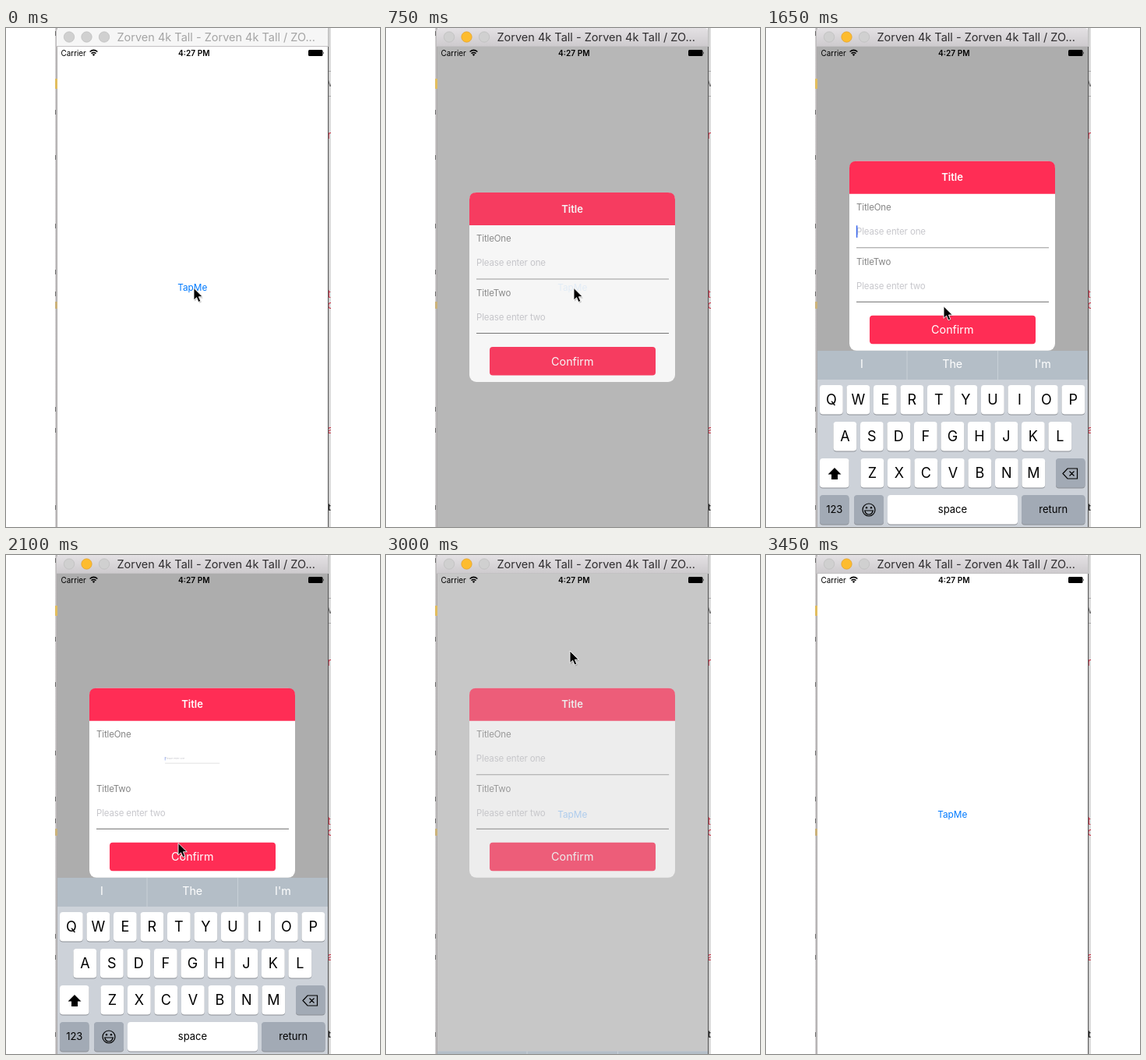
Write an HTML page that moves like this. It is 480x640 px and loops after 3.6 s.

```html
<!DOCTYPE html>
<html lang="en">
<head>
<meta charset="utf-8">
<style>
  html, body { margin: 0; width: 100%; height: 100%; overflow: hidden; background: #fff; }
  svg { display: block; width: 480px; height: 640px; font-family: Inter, Roboto, sans-serif; }
  .mid { text-anchor: middle; }
  .label { font-size: 11.5px; letter-spacing: -.15px; fill: #858585; }
  .hint { font-size: 11.5px; letter-spacing: -.15px; fill: #c7c7cc; }
  .side { font-size: 13px; fill: #d02a40; }
</style>
</head>
<body>
<svg viewBox="0 0 480 640">
  <defs>
    <linearGradient id="bar" x2="0" y2="1">
      <stop stop-color="#e4e1e4"/><stop offset="1" stop-color="#cdcacd"/>
    </linearGradient>
    <linearGradient id="leftShadow">
      <stop stop-color="#dcdadb"/><stop offset="1" stop-color="#a3a0a1"/>
    </linearGradient>
    <linearGradient id="rightShadow">
      <stop stop-color="#bdbdbd"/><stop offset="1" stop-color="#e4e4e4"/>
    </linearGradient>
    <clipPath id="strip"><path d="M63 0H417V640H63z"/></clipPath>
    <clipPath id="screen"><path d="M66 24H413V640H66z"/></clipPath>
  </defs>

  <g clip-path="url(#strip)">
    <path d="M413 0h4v640h-4z" fill="url(#rightShadow)"/>
    <path d="M413 55.5h4M413 87.5h4" stroke="#a4a4a4"/>
    <path d="M63 0h3v640h-3z" fill="url(#leftShadow)"/>
    <path d="M63 65h3v13h-3z" fill="#e2bd5e"/>
    <path d="M63 351h3v9h-3z" fill="#cbb27a"/>
    <g id="specks" fill="#6a6a6a"></g>
    <g class="side">
      <text x="412.5" y="142">r</text><text x="412.5" y="346">t</text>
      <text x="412.5" y="360">c</text><text x="412.5" y="520">a</text>
      <text x="412.5" y="75" fill="#666">v</text>
      <text x="412.5" y="619" font-size="12" fill="#222" font-weight="700">t</text>
    </g>
    <path d="M413.5 24V640" stroke="#595959"/>
  </g>

  <path d="M66 24H413V640H66z" fill="#fff"/>
  <path id="titleBar" d="M65 24V4Q65 0 69 0H409Q413 0 413 4V24z"/>
  <path d="M65 23.5H413" stroke="#c3c1c3"/>
  <g fill="#d0d0d0" stroke="#bcbcbc" stroke-width=".7">
    <circle cx="81" cy="11.5" r="6.7"/>
    <circle id="amber" cx="103.5" cy="11.5" r="6.7"/>
    <circle cx="126" cy="11.5" r="6.7"/>
  </g>
  <text id="caption" x="142.5" y="17" font-size="14.5">Zorven 4k Tall - Zorven 4k Tall / ZO...</text>

  <g clip-path="url(#screen)">
    <text class="mid" x="239.3" y="337" font-size="11.8" fill="#007aff">TapMe</text>
    <path id="shade" d="M65 24H413V640H65z"/>
    <g font-size="9.9">
      <text x="70.5" y="36">Carrier</text>
      <text class="mid" x="241.3" y="36" font-size="10.1" font-weight="600">4:27 PM</text>
      <g fill="none" stroke="#000" stroke-width="1.5">
        <path d="M107.6 30.5Q112.5 26.3 117.4 30.5M109.5 32.6Q112.5 30.2 115.5 32.6"/>
      </g>
      <path d="M110.7 34Q112.5 32.7 114.3 34L112.5 36z"/>
      <rect x="388" y="28" width="18.5" height="8" rx="1.5"/>
      <path d="M407 30.5q1.6 1.5 0 3z"/>
    </g>

    <!-- popup, with its own origin at the left top corner -->
    <g id="popup">
      <rect width="264" height="243" rx="9" fill="#fff"/>
      <path d="M0 42V9Q0 0 9 0H255Q264 0 264 9V42z" fill="#ff2d55"/>
      <text class="mid" x="132" y="25.5" font-size="13" font-weight="600" fill="#fff">Title</text>
      <text class="label" x="9" y="63">TitleOne</text>
      <g id="field">
        <text class="hint" x="9" y="94.3">Please enter one</text>
        <path d="M9 111H256" stroke="#969696"/>
        <path id="caret" d="M9.6 82.5V98" stroke="#3f6bf0" stroke-width="1.6"/>
      </g>
      <text class="label" x="9" y="132.8">TitleTwo</text>
      <text class="hint" x="9" y="164">Please enter two</text>
      <path d="M9 180.5H256" stroke="#6e6e6e"/>
      <rect x="26" y="198" width="213" height="36.5" rx="4" fill="#ff2d55"/>
      <text class="mid" x="132.3" y="221.5" font-size="14.3" fill="#fff">Confirm</text>
    </g>
    <g id="keyboard"></g>
  </g>

  <g id="pointer">
    <path d="M1 2V17L4.5 14L7 19.5L10 18L7.5 13H12z" fill="#000" opacity=".2"/>
    <path d="M0 0V15.5L3.6 12.2L6 18L8.8 16.8L6.4 11.2H11.3z" stroke="#fff" stroke-width=".9"/>
  </g>
</svg>
<script>
const LOOP = 3600, STEP = 150, KEYBOARD_HEIGHT = 226;
const $ = id => document.getElementById(id);
const clamp = x => Math.min(1, Math.max(0, x));
const mix = (a, b, k) => a + (b - a) * k;
const smooth = (t, start, end) => {
  const k = clamp((t - start) / (end - start));
  return k * k * (3 - 2 * k);
};
// critically damped spring from 0 to 1
const settle = (t, start) => {
  const u = Math.max(0, t - start) * 0.01826;
  return 1 - (1 + u) * Math.exp(-u);
};

function key(x, y, width, text, size, fill = '#fff') {
  return `<rect x="${x}" y="${y + 1}" width="${width}" height="37.5" rx="4" fill="#8b8f95"/>
    <rect x="${x}" y="${y}" width="${width}" height="37.5" rx="4" fill="${fill}"/>
    <text class="mid" x="${x + width / 2}" y="${y + 18.5 + size * .37}" font-size="${size}">${text}</text>`;
}

function keyboardMarkup() {
  const gray = '#a2aab5';
  let out = `<path d="M66 414H413V640H66z" fill="#cdd2d9"/>
    <path d="M66 414H413V451H66z" fill="#b4bec7"/>
    <path d="M181 414V451M297.5 414V451" stroke="#c8d0d7"/>`;
  ['I', 'The', "I'm"].forEach((word, i) =>
    out += `<text class="mid" x="${123 + i * 116.2}" y="436.3" font-size="14.3" fill="#fff">${word}</text>`);
  [['QWERTYUIOP', 69, 458], ['ASDFGHJKL', 86.5, 505], ['ZXCVBNM', 121.5, 552]].forEach(([letters, x, y]) =>
    [...letters].forEach((letter, i) => out += key(x + i * 34.5, y, 29.7, letter, 18)));
  out += key(69, 552, 37.5, '', 14) + key(372, 552, 37.5, '', 14, gray)
    + key(69, 599, 37.5, '123', 13, gray) + key(113, 599, 38, '', 14, gray)
    + key(156, 599, 167, 'space', 13) + key(328, 599, 81.5, 'return', 13, gray);
  return out + `<path d="M88 564L96.5 572.5H92V579H84V572.5H79.5z"/>
    <g fill="none" stroke="#000" stroke-width="1.2">
      <path d="M381 571.5L387 565H399.5V578H387zM389.5 568.5L395.5 574.5M395.5 568.5L389.5 574.5"/>
      <circle cx="132" cy="618" r="8"/>
      <path d="M126.7 619H137.3Q136 624 132 624T126.7 619z"/>
    </g>
    <circle cx="129" cy="615.3" r="1.2"/><circle cx="135" cy="615.3" r="1.2"/>`;
}

function pointerAt(t) {
  const toButton = smooth(t, 1350, 1850), toOutside = smooth(t, 2250, 2700);
  const x = mix(mix(241, 221, toButton), 236, toOutside);
  const y = mix(mix(333.5, 369.5, toButton), 123, toOutside);
  return [x, mix(y, -30, smooth(t, 3100, 3430))];
}

function draw(t) {
  const active = t >= 300;
  $('titleBar').setAttribute('fill', active ? 'url(#bar)' : '#f6f6f6');
  $('caption').setAttribute('fill', active ? '#2e2c2e' : '#a4a4a4');
  $('amber').setAttribute('fill', active ? '#fdbc2e' : '#d0d0d0');
  $('amber').setAttribute('stroke', active ? '#e0a030' : '#bcbcbc');

  const shown = smooth(t, 341, 859) - smooth(t, 2812, 3312);
  $('shade').setAttribute('opacity', .32 * shown);
  $('popup').setAttribute('opacity', shown);
  const raised = settle(t, 860);
  $('popup').setAttribute('transform', `translate(107 ${211 - 40.2 * raised})`);
  $('keyboard').setAttribute('transform',
    `translate(0 ${KEYBOARD_HEIGHT * (1 - raised + settle(t, 2665))})`);

  const u = t - 2060;
  const scale = u < 0 ? 1 : 1 - Math.exp(-u / 150) * Math.cos(u / 110);
  $('field').setAttribute('transform', `translate(132 90.5) scale(${scale}) translate(-132 -90.5)`);
  $('caret').setAttribute('opacity', t >= 900 && t < 2665 ? 1 : 0);
  $('pointer').setAttribute('transform', `translate(${pointerAt(t)})`);
}

$('specks').innerHTML = [7, 108, 166, 254, 313, 341, 489, 516, 615]
  .map(y => `<path d="M63 ${y - 3}h1v6h-1z"/>`).join('');
$('keyboard').innerHTML = keyboardMarkup();

const start = performance.now();
function tick() {
  const t = (performance.now() - start) % LOOP;
  draw(Math.floor(t / STEP) * STEP);
  requestAnimationFrame(tick);
}
tick();
</script>
</body>
</html>
```
